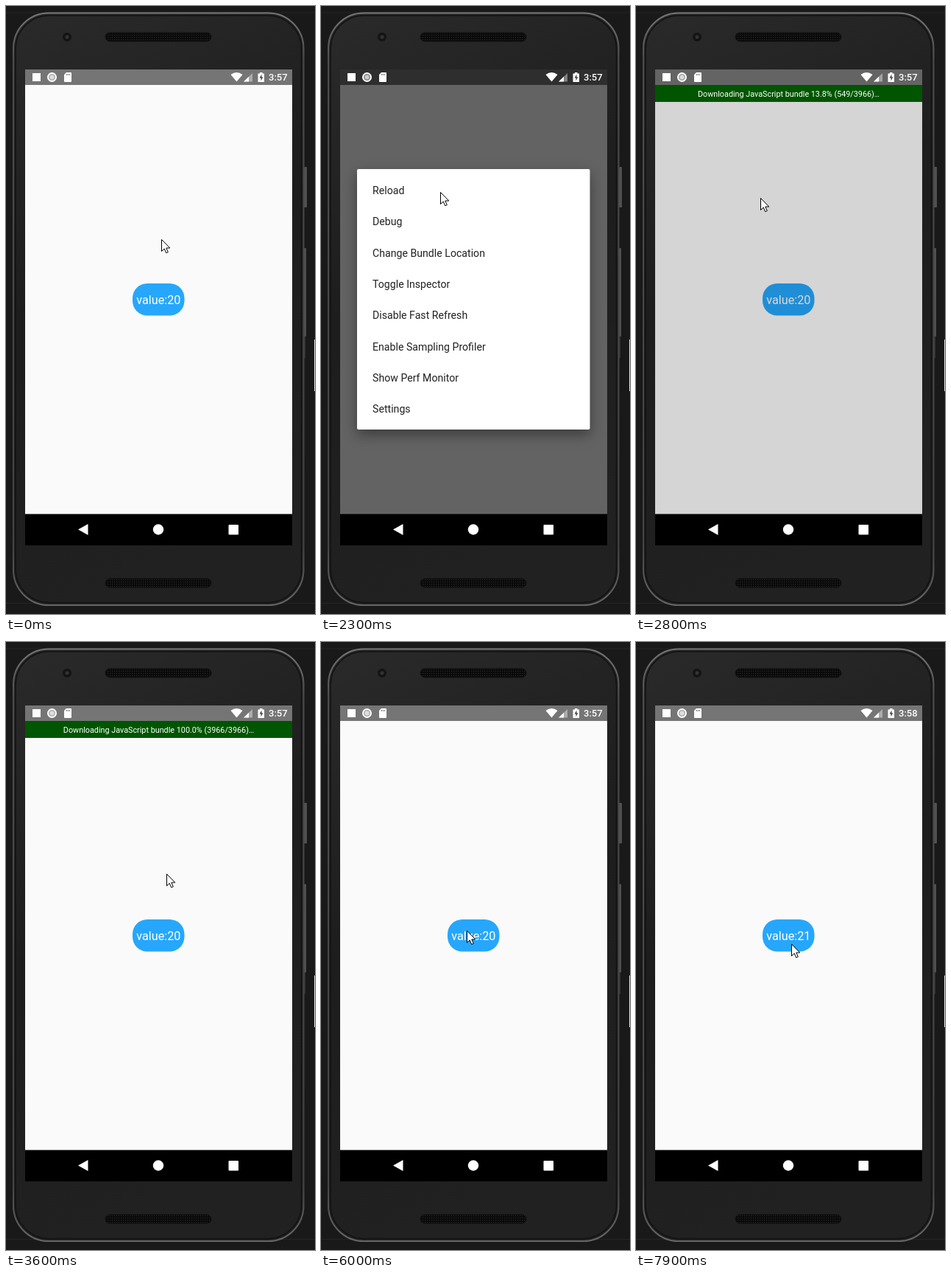
Write an HTML page that moves like this. It is 420 by 824 pixels and loops after 8000 ms.

```html
<!DOCTYPE html>
<html lang="en">
<head>
<meta charset="utf-8">
<title>Reload menu demo</title>
<style>
html, body { margin: 0; width: 100%; height: 100%; overflow: hidden; background: #191919; }
svg { display: block; width: 420px; height: 824px; font-family: Roboto, sans-serif; }
#menu { filter: drop-shadow(0 7px 9px #0006); }
</style>
</head>
<body>
<svg viewBox="0 0 420 824">
  <defs>
    <linearGradient id="shell" x2=".25" y2="1">
      <stop stop-color="#2a2a2a"/><stop offset=".5" stop-color="#1d1d1d"/><stop offset="1" stop-color="#212121"/>
    </linearGradient>
    <linearGradient id="rim" x2="0" y2="1">
      <stop stop-color="#777"/><stop offset=".08" stop-color="#4c4c4c"/><stop offset=".9" stop-color="#444"/><stop offset="1" stop-color="#666"/>
    </linearGradient>
    <pattern id="mesh" width="3" height="3" patternUnits="userSpaceOnUse">
      <rect width="3" height="3" fill="#090909"/><rect width="1.2" height="1.2" fill="#292929"/>
    </pattern>
  </defs>

  <!-- phone -->
  <rect width="420" height="824" fill="#191919"/>
  <path d="M0 9H420M0 809.5H420" stroke="#242424"/>
  <g fill="#505050">
    <rect x="405" y="218" width="4" height="55" rx="1"/>
    <rect x="405" y="328" width="3" height="120" rx="1"/>
    <rect x="405" y="448" width="2" height="29" fill="#333"/>
  </g>
  <path d="M419.5 452V522" stroke="#ddd"/>
  <rect x="10" y="9.5" width="394.5" height="802.5" rx="48" fill="url(#shell)" stroke="url(#rim)" stroke-width="2"/>
  <rect x="13" y="13" width="388.500" height="795.500" rx="45" fill="none" stroke="#121212" stroke-width="1.500"/>
  <g fill="url(#mesh)" stroke="#111">
    <rect x="135" y="36" width="144" height="12" rx="6"/>
    <rect x="135" y="776" width="144" height="12" rx="6"/>
  </g>
  <circle cx="83" cy="42" r="6" fill="#141414"/>
  <circle cx="83" cy="42" r="2.500" fill="#333"/>

  <!-- screen -->
  <rect x="26" y="86" width="363" height="603" fill="#fafafa"/>
  <rect x="26" y="86" width="363" height="21" fill="#757575"/>
  <rect x="172" y="376" width="70.500" height="43.500" rx="20" fill="#26a7fc"/>
  <text id="value" x="207.300" y="404" font-size="16.200" fill="#fff" text-anchor="middle"></text>
  <rect id="shade" x="26" y="86" width="363" height="603"/>
  <g id="menu">
    <rect id="card" x="49" y="221" width="316.500" height="353" rx="2" fill="#fff"/>
    <g id="items" font-size="14.150" fill="#212121"></g>
  </g>
  <g id="bar">
    <rect x="26" y="107" width="363" height="23" fill="#005500"/>
    <text id="progress" x="207.500" y="122.700" font-size="10.800" fill="#fff" text-anchor="middle"></text>
  </g>

  <!-- status icons -->
  <g fill="#fff">
    <rect x="36" y="91" width="11" height="11"/>
    <circle cx="62.500" cy="96.500" r="5.500" fill="#fff6" stroke="#fff" stroke-width="2"/>
    <circle cx="62.500" cy="96.500" r="3" fill="#fff9"/>
    <path d="M82 90H88Q89 90 89 91V102Q89 103 88 103H80Q79 103 79 102V93Z"/>
    <path d="M82.500 92v2M84.500 92v2M86.500 92v2" stroke="#777"/>
    <path d="M305.500 93Q313.500 87 321.500 93L313.500 102.500Z"/>
    <path d="M323 102.500L335 91V102.500Z" fill="#fff6"/>
    <path d="M323 102.500L330 95.800V102.500Z"/>
    <path d="M342.500 91.500H345V90H348.500V91.500H351V103H342.500Z"/>
    <path d="M347.500 92.500L344.500 97.500H346.500V101.500L349.300 96.300H347.500Z" fill="#444"/>
    <text id="clock" x="357" y="101" font-size="13" font-weight="500"></text>
  </g>

  <!-- navigation -->
  <rect x="26" y="688.500" width="363" height="42.500"/>
  <g fill="#fff">
    <path d="M98 709.500L111.500 702V717Z"/>
    <circle cx="207" cy="709.500" r="7.200"/>
    <rect x="302.500" y="703" width="13.500" height="13.500" rx="1"/>
  </g>

  <path id="cursor" d="M.5 .5V16.500L4.200 13L6.700 18.700L9.300 17.600L6.800 12H11.800Z" fill="#fff" stroke="#000"/>
</svg>
<script>
const LOOP = 8000, STEP = 100, FILES = 3966;
const $ = id => document.getElementById(id);

// Rows of [time, value, ...]; values are linear between rows.
const CURSOR = [
  [0, 211, 316], [300, 211, 316], [400, 211, 317], [1800, 211, 317], [2300, 162, 252],
  [2700, 162, 252], [3500, 218, 314], [3800, 218, 314], [4000, 216, 314], [4600, 216, 314],
  [4800, 214, 318], [4900, 214, 318], [5000, 214, 319], [5400, 214, 319], [6000, 198, 391],
  [6400, 198, 391], [7100, 195, 431], [7300, 192, 434], [7500, 192, 434], [7800, 209, 402], [7900, 211, 409]
];
const SHADE = [[1400, 0], [1500, .31], [1600, .5], [1700, .605], [2600, .605], [2700, .38], [2800, .15], [2900, 0]];
const CARD = [[1400, 0], [1500, .96], [1600, 1], [2600, 1], [2700, .08], [2800, 0]];
const ITEMS = [[1400, 0], [1500, .96], [1600, 1], [2600, 1], [2700, .22], [2800, 0]];

function sample(track, t) {
  const next = track.findIndex(row => row[0] > t);
  if (next < 0) return track[track.length - 1].slice(1);
  if (next === 0) return track[0].slice(1);
  const a = track[next - 1], b = track[next], p = (t - a[0]) / (b[0] - a[0]);
  return a.slice(1).map((v, i) => v + (b[i + 1] - v) * p);
}

function setText(id, text) {
  if ($(id).textContent !== text) $(id).textContent = text;
}

const labels = ['Reload', 'Debug', 'Change Bundle Location', 'Toggle Inspector',
  'Disable Fast Refresh', 'Enable Sampling Profiler', 'Show Perf Monitor', 'Settings'];
$('items').innerHTML = labels
  .map((label, i) => `<text x="70" y="${255 + i * 42.3}">${label}</text>`).join('');

function draw(t) {
  const [x, y] = sample(CURSOR, t).map(Math.round);
  $('cursor').setAttribute('transform', `translate(${x} ${y})`);
  $('shade').setAttribute('opacity', sample(SHADE, t)[0]);
  $('card').setAttribute('opacity', sample(CARD, t)[0]);
  $('items').setAttribute('opacity', sample(ITEMS, t)[0]);

  $('bar').style.display = t >= 2700 && t < 3700 ? '' : 'none';
  const done = Math.round(sample([[2700, 61], [3500, FILES]], t)[0]);
  setText('progress', `Downloading JavaScript bundle ${(done / FILES * 100).toFixed(1)}% (${done}/${FILES})…`);
  setText('value', 'value:' + (t < 6300 ? 20 : 21));
  setText('clock', t < 6800 ? '3:57' : '3:58');
}

const start = performance.now();
function tick() {
  const t = (performance.now() - start) % LOOP;
  draw(Math.floor(t / STEP) * STEP);
  requestAnimationFrame(tick);
}
tick();
</script>
</body>
</html>
```
